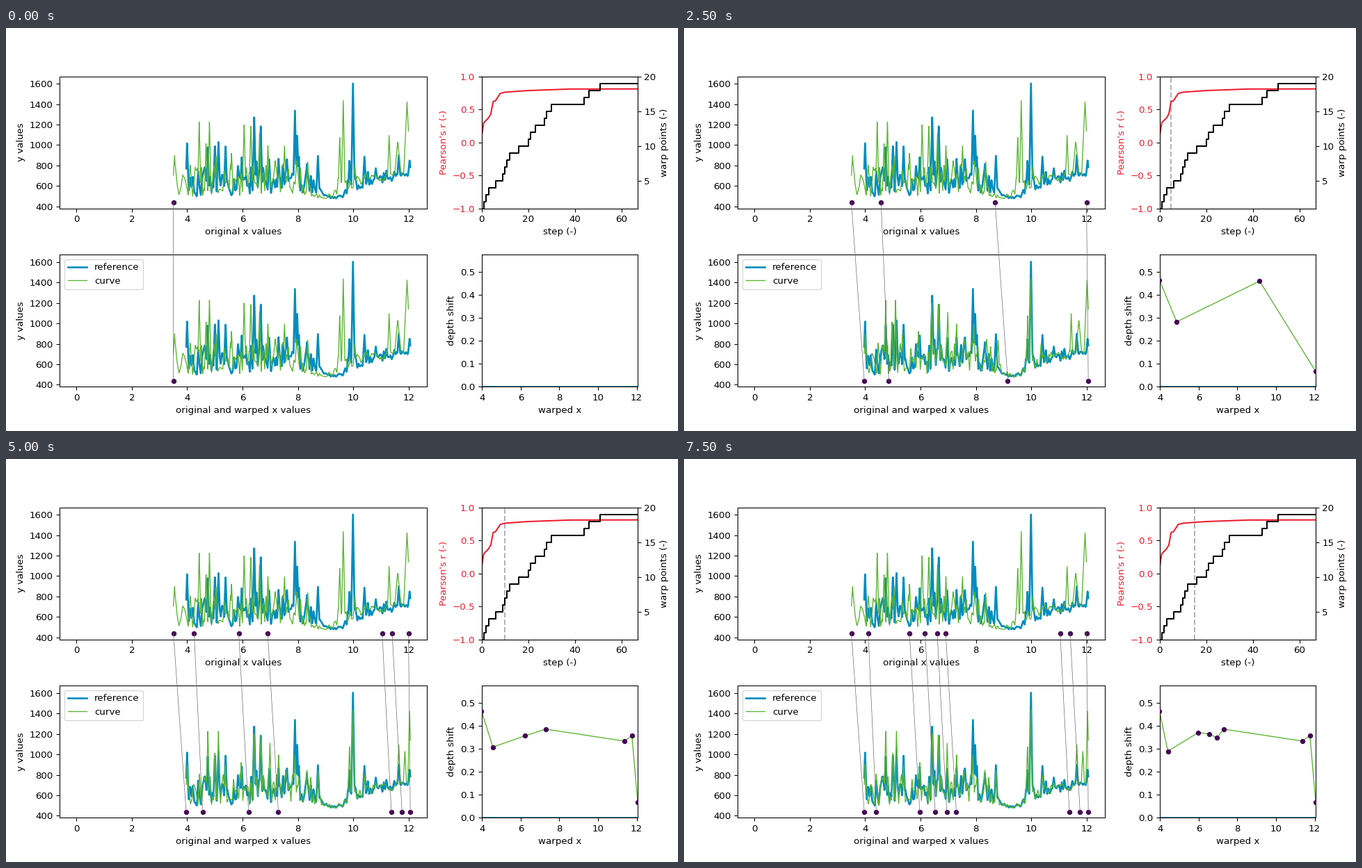
A matplotlib script for the animation above (8 s loop, 966 by 580 pixels).

```python
import numpy as np
import matplotlib.pyplot as plt
from matplotlib.animation import FuncAnimation
from matplotlib.lines import Line2D

BLUE, GREEN, RED, DOT = "#008dbe", "#5ab531", "#ec1c2c", "#440154"
FLOOR = 440
STEPS = 16
START, END = 3.965, 12.055

# Per step: the warp point removed, then the one added as (x, shift)
EDITS = [
    (None, (3.5, 0)), (None, (11.99, .066)), (None, (3.8, .464)),
    (None, (4.895, .422)), (3.8, (4.57, .282)), (4.895, (8.69, .459)),
    (None, (6.905, .385)), (4.57, (4.25, .307)), (8.69, (11.04, .333)),
    (None, (11.4, .357)), (None, (5.86, .356)), (None, (6.61, .359)),
    (None, (6.16, .364)), (5.86, (5.6, .370)), (4.25, (4.11, .289)),
    (6.61, (6.6, .348)),
]

# Events seen by both signals: x, height in reference, height in curve
EVENTS = [
    (3.995, 1020, 900), (4.74, 985, 1235), (5.0, 1005, 1030),
    (5.13, 1040, 1240), (5.385, 1000, 900), (5.97, 890, 930),
    (6.42, 1285, 1210), (6.655, 1200, 1200), (6.96, 860, 1110),
    (7.3, 870, 1000), (7.89, 1350, 1000), (7.97, 1110, 700),
    (8.32, 820, 850), (8.72, 900, 840), (9.86, 850, 1080),
    (9.985, 1613, 1445), (10.4, 890, 800), (11.64, 900, 1095),
    (11.86, 700, 1040), (12.03, 850, 1425),
]


def warp_points(step):
    points = {}
    for gone, (x, shift) in EDITS[:step + 1]:
        points.pop(gone, None)
        points[x] = shift
    if step:
        points[3.5] = .464
    x = np.array(sorted(points))
    return x, np.array([points[v] for v in x])


def signal(u, column, rng, shared):
    """Jagged noise on a slow floor, with the events as narrow spikes."""
    floor = np.interp(u, [4, 8.2, 9.2, 9.6, 10.2, 12], [480, 530, 475, 480, 570, 680])
    busy = np.interp(u, [4, 8.2, 9.1, 9.6, 9.8, 12], [380, 330, 40, 40, 190, 120])
    noise = .7 * shared ** 2 + .5 * rng.random(len(shared)) ** 2
    y = floor + busy * np.interp(u, np.linspace(START, END, len(shared)), noise)
    for event in EVENTS:
        ramp = np.clip(1 - abs(u - event[0]) / .065, 0, 1)
        y = np.maximum(y, floor + (event[column] - floor) * ramp)
    return y


rng = np.random.default_rng(5)
shared = rng.random(170)
ref_x = np.linspace(START, END, 1600)
ref_y = signal(ref_x, 1, rng, shared)
cur_y = signal(ref_x, 2, rng, shared)
# The unwarped curve is the aligned one pulled back through the last warp
last_x, last_shift = warp_points(STEPS - 1)
cur_x = np.interp(ref_x, last_x + last_shift, last_x)

# 966 x 580 pixels
fig = plt.figure(figsize=(10, 6.0042), dpi=96.6)
grid = fig.add_gridspec(2, 3, left=.08, right=.94, bottom=.11, top=.88,
                        wspace=.35, hspace=.35)
top, low = fig.add_subplot(grid[0, :2]), fig.add_subplot(grid[1, :2])
corr, depth = fig.add_subplot(grid[0, 2]), fig.add_subplot(grid[1, 2])
count = corr.twinx()

curves, dots = [], []
for ax, label in ((top, "original x values"),
                  (low, "original and warped x values")):
    ax.plot(ref_x, ref_y, color=BLUE, lw=2, label="reference")
    curves += ax.plot(cur_x, cur_y, color=GREEN, lw=1, label="curve")
    dots.append(ax.scatter([], [], s=20, color=DOT, zorder=3))
    ax.set(xlim=(-.6025, 12.6525), ylim=(381.5, 1671), xlabel=label,
           ylabel="y values", xticks=range(0, 13, 2),
           yticks=range(400, 1601, 200))
low.legend(loc="upper left")

corr.plot([0, 1, 3, 4, 5, 6, 8, 10, 20, 38, 67],
          [.08, .30, .37, .43, .62, .63, .74, .76, .785, .808, .81],
          color=RED, lw=1.5)
corr.set(xlim=(0, 67), ylim=(-1, 1), xlabel="step (-)",
         xticks=range(0, 61, 20), yticks=np.arange(-1, 1.1, .5))
corr.set_ylabel("Pearson's r (-)", color=RED)
corr.tick_params(axis="y", labelcolor=RED)
marker = corr.axvline(0, color="0.7", ls="--", lw=1.5, zorder=1)

# Points so far, then one more at each later jump
sizes = [len(warp_points(s)[0]) for s in range(STEPS)]
later = [16, 20, 21, 23, 27, 28, 30, 44, 46, 51]
sizes += [sizes[-1] + sum(s >= j for j in later) for s in range(STEPS, 68)]
count.step(range(68), sizes, where="post", color="k", lw=1.5)
count.set(ylim=(1, 20), yticks=range(5, 21, 5), ylabel="warp points (-)")

depth.axhline(0, color=BLUE, lw=2)
shift_line, = depth.plot([], [], color=GREEN, lw=1)
shift_dots = depth.scatter([], [], s=20, color=DOT, zorder=3)
depth.set(xlim=(START, END), ylim=(0, .5742), xlabel="warped x",
          ylabel="depth shift", xticks=range(4, 13, 2),
          yticks=np.arange(0, .51, .1))

links = Line2D([], [], color="0.4", lw=.5, transform=fig.transFigure)
links.set_snap(False)
fig.add_artist(links)


def on_floor(x):
    return np.column_stack([x, np.full(len(x), FLOOR)])


def on_figure(ax, x):
    to_fig = ax.transData + fig.transFigure.inverted()
    return to_fig.transform(on_floor(x))


def update(step):
    px, shift = warp_points(step)
    wx = px + shift
    curves[1].set_xdata(cur_x + np.interp(cur_x, px, shift))
    for sc, x in zip(dots, (px, wx)):
        sc.set_offsets(on_floor(x))
    a, b = on_figure(top, px), on_figure(low, wx)
    path = np.stack([a, b, np.full_like(a, np.nan)], axis=1).reshape(-1, 2)
    links.set_data(path[:, 0], path[:, 1])
    marker.set_xdata([step, step])
    shift_line.set_data(wx, shift)
    shift_dots.set_offsets(np.column_stack([wx, shift]))
    return [*curves, *dots, links, marker, shift_line, shift_dots]


anim = FuncAnimation(fig, update, frames=STEPS, interval=500, repeat=True,
                     repeat_delay=0)
plt.show()
```
